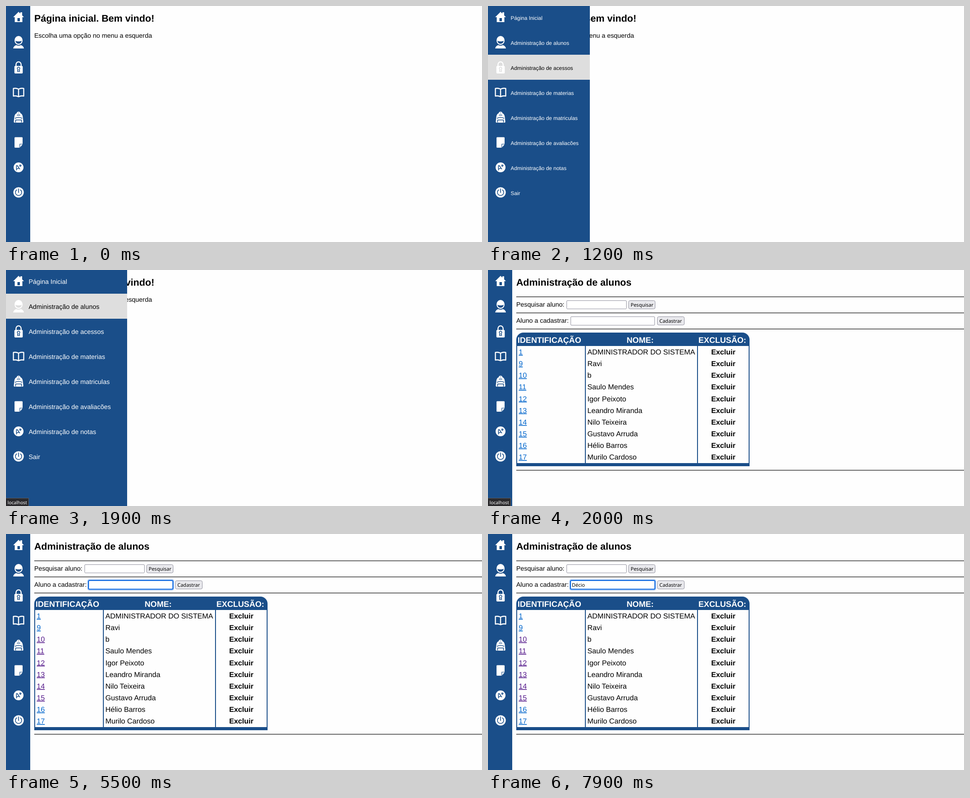
An HTML page that plays this animation: 1061 by 528 pixels, repeating every 8 s.

```html
<!DOCTYPE html>
<html lang="pt-BR">
<head>
<meta charset="utf-8">
<title>Administração de alunos</title>
<style>
html, body { margin: 0; width: 100%; height: 100%; overflow: hidden; background: #fefefe; }
svg { display: block; --blue: #1a4e89; --bg: var(--blue); }
text { font: 14.4px Arial, "Liberation Sans", sans-serif; white-space: pre; text-rendering: geometricPrecision; }
.title { font-size: 21.6px; font-weight: bold; }
.head { font-size: 18.1px; font-weight: bold; fill: #fff; }
.cell { font-size: 16.2px; }
.bold { font-weight: bold; }
.link { fill: #06c; text-decoration: underline; }
.visited .seen { fill: #551a8b; }
.ui { font: 11px "Noto Sans", "Open Sans", sans-serif; }
.blue { fill: var(--blue); }
.field { fill: #fff; stroke: #8f8f9d; }
.button { fill: #e9e9ed; stroke: #8f8f9d; }
.item { fill: #fff; }
.item .row { fill: none; }
.item .cut { fill: var(--bg); }
.item .line { fill: none; stroke: #fff; stroke-width: 2.4; stroke-linejoin: round; }
.item .cutline { fill: none; stroke: var(--bg); stroke-width: 1.6; stroke-linejoin: round; }
.item.on { --bg: #dedede; }
.item.on .row { fill: #dedede; }
.item.on text { fill: #000; }
</style>
</head>
<body>
<svg id="stage" width="1061" height="528" viewBox="0 0 1061 528"></svg>
<script>
const $ = id => document.getElementById(id);
const text = (x, y, s, cls = '', more = '') => `<text x="${x}" y="${y}" class="${cls}" ${more}>${s}</text>`;
const rect = (x, y, w, h, cls = '', more = '') =>
  `<rect x="${x}" y="${y}" width="${w}" height="${h}" class="${cls}" ${more}/>`;
const path = (d, cls = '') => `<path d="${d}" class="${cls}"/>`;
const rule = y => rect(63, y, 998, 2, '', 'fill="#666"');

// Icons are drawn around their own centre
const menu = [
  ['Página Inicial',
    path('M0-12 4-8V-11H8V-4L12 0H8.5V11H-8.5V0H-12Z') + path('M-2.5 2H3V9H-2.5Z', 'cut')],
  ['Administração de alunos',
    '<ellipse cy="-4" rx="9" ry="10"/>' + path('M-7-3Q0-.5 7-3Q5.5 3.5 0 3.5T-7-3Z', 'cut') +
    path('M-12 14Q-11 8-5 6.5Q0 9 5 6.5Q11 8 12 14Z')],
  ['Administração de acessos',
    path('M-5.7-2V-6A5.7 6 0 0 1 5.7-6V-2', 'line') + rect(-9.3, -3, 18.6, 17, '', 'rx="2"') +
    path('M-1.4 5A2.8 2.8 0 1 1 1.4 5L2.4 9.3H-2.4Z', 'cutline')],
  ['Administração de materias',
    path('M0-7Q-6-10-11.5-8.5V8.5Q-6 7 0 10Q6 7 11.5 8.5V-8.5Q6-10 0-7V10', 'line')],
  ['Administração de matriculas',
    path('M-3-8.5Q-3-11.3 0-11.3T3-8.5', 'line') +
    path('M-4.5-9H4.5Q9-7 9.5 0L10.7 10Q10.7 12 8.7 12H-8.7Q-10.7 12-10.7 10L-9.5 0Q-9-7-4.5-9Z') +
    path('M-3.5-4.5Q0-6 3.5-4.5M-8 2.5Q0-2.5 8 2.5M-6.5 11.5V6H6.5V11.5', 'cutline')],
  ['Administração de avaliacões',
    path('M-9-10Q-9-11.5-7.5-11.5H7.5Q9-11.5 9-10V3.4H2.2V12H-7.5Q-9 12-9 10.5Z') + path('M3.4 11.5V4.6H9Z')],
  ['Administração de notas',
    '<circle r="11"/><g transform="rotate(-18)">' + path('M-6.5 5-3.3-5H-1.7L1.5 5M-5 2H0', 'cutline') +
    path('M5-5.5V.5M2-2.5H8', 'cutline') + '</g>'],
  ['Sair',
    '<circle r="11.6"/>' + path('M-3.5-6A7 7 0 1 0 3.5-6M0-8.5V1', 'cutline')]
];

const students = [
  [1, 'ADMINISTRADOR DO SISTEMA'], [9, 'Ravi'], [10, 'b'], [11, 'Saulo Mendes'],
  [12, 'Igor Peixoto'], [13, 'Leandro Miranda'], [14, 'Nilo Teixeira'],
  [15, 'Gustavo Arruda'], [16, 'Hélio Barros'], [17, 'Murilo Cardoso']
];

const home = text(63, 35, 'Página inicial. Bem vindo!', 'title') +
  text(63, 71, 'Escolha uma opção no menu a esquerda');

const table = path('M63 170V156A16 16 0 0 1 79 140H567A16 16 0 0 1 583 156V170Z', 'blue') +
  text(66, 162.5, 'IDENTIFICAÇÃO', 'head') + text(309, 162.5, 'NOME:', 'head') +
  text(469, 162.5, 'EXCLUSÃO:', 'head') +
  [63, 216, 466, 581].map(x => rect(x, 169, 2, 264, 'blue')).join('') + rect(63, 432, 520, 7, 'blue') +
  rect(471, 174, 107, 19, 'blue', 'id="rowHover"') +
  students.map(([id, name], k) => {
    const y = 189 + 26.15 * k;
    return text(68.5, y, id, 'cell link' + (id > 9 && id < 16 ? ' seen' : '')) + text(221.5, y, name, 'cell') +
      text(497.5, y, 'Excluir', 'cell bold', k ? '' : 'id="firstDelete"');
  }).join('');

const form = text(63, 35, 'Administração de alunos', 'title') +
  text(63, 82, 'Pesquisar aluno:') + rect(175.5, 68.5, 133, 18.5, 'field', 'rx="1.5"') +
  rect(313.5, 68.5, 59, 18.5, 'button', 'rx="3"') + text(318, 82, 'Pesquisar', 'ui') +
  text(63, 118, 'Aluno a cadastrar:') + rect(184.5, 104.5, 187, 19, 'field', 'rx="1.5" id="nameField"') +
  `<g id="focus" fill="none" stroke="#0060df" stroke-width="2">
    ${rect(182, 102, 192, 23.5, '', 'rx="4" stroke-opacity=".3"')}
    ${rect(184, 104, 188, 19.5, '', 'rx="2" fill="#fff"')}</g>` +
  rect(377.5, 104.5, 60, 18.5, 'button', 'rx="3"') + text(382, 118, 'Cadastrar', 'ui') +
  text(187, 118, '', 'ui', 'id="typed"') + rect(187, 106, 1, 15, '', 'id="caret"');

const popup = rect(184.5, 125.5, 188, 37, '', 'fill="#fff" stroke="#c4c4cc"') +
  text(188, 139, 'Décio', 'ui') + text(188, 156, 'Dario', 'ui');

$('stage').innerHTML = `
  <clipPath id="clip"><rect id="clipBox" height="528"/></clipPath>
  <g id="home">${home}</g>
  <g id="students">${[59, 95, 131, 447].map(rule).join('')}${form}${table}<g id="popup">${popup}</g></g>
  <g clip-path="url(#clip)">${rect(0, 0, 270, 528, 'blue')}
    ${menu.map(([label, icon], i) => `<g class="item">${rect(0, 56 * i - 3, 270, 56, 'row')}
      <g transform="translate(28 ${25 + 56 * i})">${icon}</g>${text(50.5, 30.5 + 56 * i, label)}</g>`).join('')}
  </g>
  <g id="status">${rect(-.5, 510.5, 51, 18, '', 'fill="#2b2a2d" stroke="#5b5b60"')}
    ${text(3.5, 524, 'localhost', 'ui', 'fill="#fff" style="font-size:10.3px"')}</g>`;

const items = [...document.querySelectorAll('.item')];
const show = (id, on) => $(id).style.display = on ? '' : 'none';

// CSS "ease" timing: cubic-bezier(.25, .1, .25, 1)
function ease(x) {
  if (x <= 0 || x >= 1) return x <= 0 ? 0 : 1;
  const curve = (a, b, u) => 3 * a * u * (1 - u) ** 2 + 3 * b * u * u * (1 - u) + u ** 3;
  let lo = 0, hi = 1;
  for (let i = 0; i < 24; i++) {
    const mid = (lo + hi) / 2;
    if (curve(.25, .25, mid) < x) lo = mid; else hi = mid;
  }
  return curve(.1, 1, lo);
}

function draw(t) {
  const within = (a, b) => t >= a && t < b;
  const listed = t >= 2000;
  show('home', !listed);
  show('students', listed);
  $('students').classList.toggle('visited', t >= 2100);

  const open = listed || t < 1000 ? 0 : ease((t - 950) / 500);
  const hovered = !open ? -1 : t < 1500 ? 2 : 1;
  $('clipBox').setAttribute('width', Math.round(54 + 216 * open));
  items.forEach((item, i) => {
    item.classList.toggle('on', i === hovered);
    const label = item.lastElementChild;
    label.style.fontSize = 14.4 * open ** .86 + 'px';
    label.style.display = open ? '' : 'none';
  });
  show('status', within(1600, 2200));

  const rowOn = within(3200, 3300);
  show('rowHover', rowOn);
  $('firstDelete').style.fill = rowOn ? '#fff' : '';
  $('nameField').style.stroke = t >= 3500 ? '#676774' : '';

  show('focus', t >= 4100);
  const count = [6500, 7000, 7400, 7500, 7600].filter(at => t >= at).length;
  const typed = $('typed');
  typed.textContent = 'Décio'.slice(0, count);
  $('caret').setAttribute('x', 187 + Math.round(count ? typed.getComputedTextLength() : 0));
  show('caret', within(4100, 4600) || within(5000, 5500) || within(6000, 7900));
  show('popup', within(6600, 7100));
}

// The picture advances in steps of 100 ms
const start = performance.now();
function tick() {
  draw(Math.floor((performance.now() - start) % 8000 / 100) * 100);
  requestAnimationFrame(tick);
}
tick();
</script>
</body>
</html>
```
